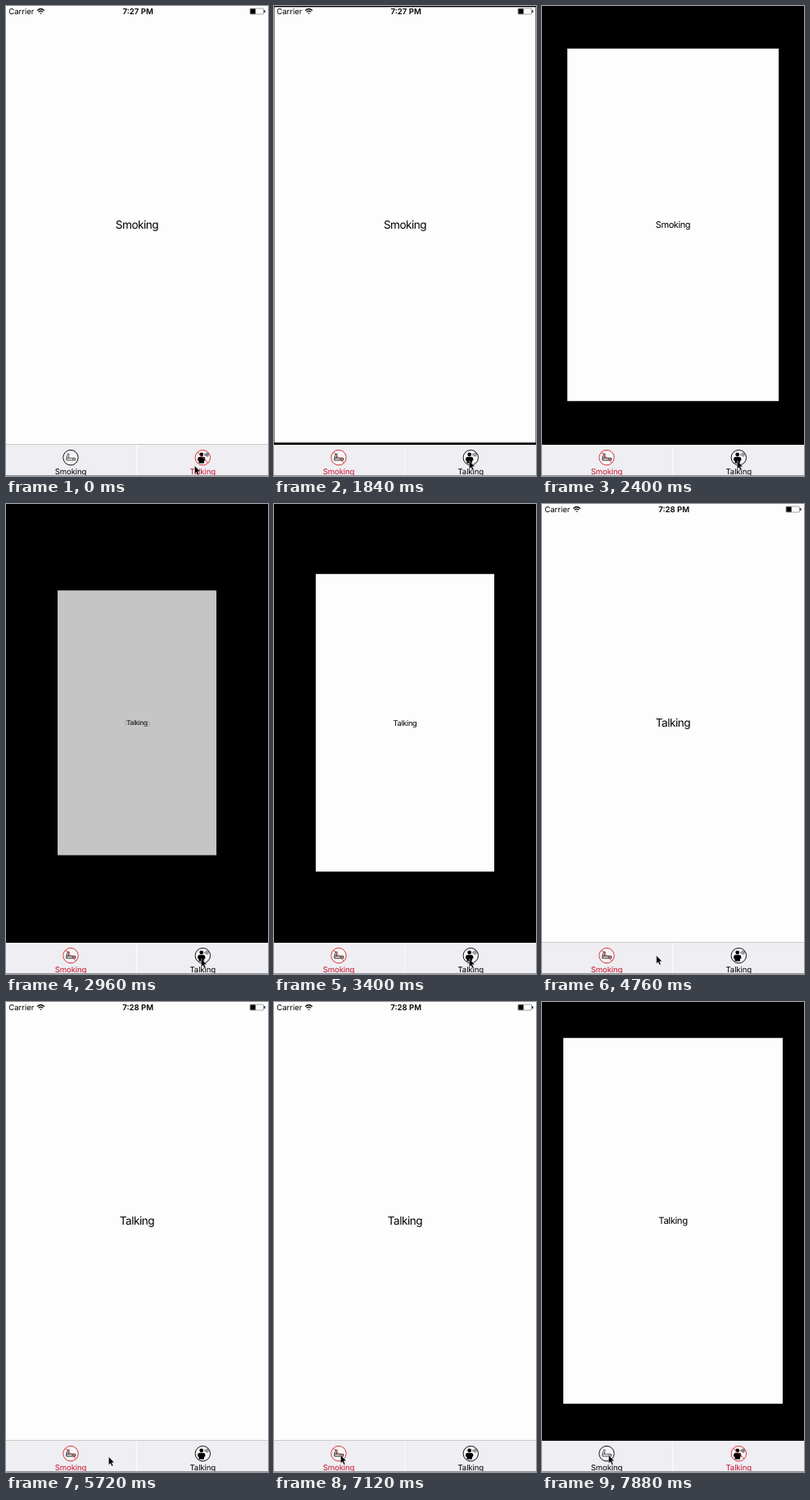
Animation of 320x572 px, one loop 8000 ms. Source, as an HTML page:

```html
<!DOCTYPE html>
<html lang="en">
<head>
<meta charset="utf-8">
<title>Tab zoom transition</title>
<style>
  html, body { margin: 0; width: 100%; height: 100%; overflow: hidden; background: #000; }
  svg { display: block; width: 100%; height: 100%; }
  text { font-family: Inter, Roboto, sans-serif; text-rendering: geometricPrecision; }
  .view text { font-size: 13.6px; letter-spacing: -.5px; text-anchor: middle; }
  .view rect { fill: #fdfdfd; }
  .tab text { font-size: 9.6px; letter-spacing: -.1px; text-anchor: middle; }
  .ring { fill: #f6f6f9; stroke: #111; }
  .line { fill: none; stroke: #222; stroke-width: .8; }
  .slash { stroke: #dc3434; visibility: hidden; }
  .off text { fill: #c8142f; }
  .off .ring { stroke: #dc3434; }
  .off .slash { visibility: visible; }
  .off .line { stroke-width: 1; }
</style>
</head>
<body>
<svg viewBox="0 0 320 572" preserveAspectRatio="none">
  <rect id="back" width="320" height="572"/>

  <g class="view" id="smokingView">
    <rect x="-160" y="-265.8" width="320" height="531.6"/>
    <text y="4.8">Smoking</text>
  </g>
  <g class="view" id="talkingView">
    <rect x="-160" y="-265.8" width="320" height="531.6"/>
    <text y="4.8">Talking</text>
  </g>

  <text x="3.3" y="10" font-size="9.5">Carrier</text>
  <g fill="none" stroke="#000" stroke-width="1.3">
    <path d="M38.2 5.4Q42.5 1.5 46.8 5.4M39.8 7.3Q42.5 5 45.2 7.3"/>
    <path d="M41.2 8.4h2.6L42.5 9.9z" fill="#000" stroke="none"/>
  </g>
  <text id="clock" x="161.2" y="10" font-size="9.6" font-weight="600" text-anchor="middle">7:27 PM</text>
  <rect x="298" y="3" width="16.5" height="7" rx="1" fill="none" stroke="#000" stroke-opacity=".5" stroke-width=".7"/>
  <rect x="298.4" y="3.4" width="6.3" height="6.2"/>
  <rect x="315.2" y="5" width="1.2" height="3"/>

  <rect y="534" width="320" height="38" fill="#eeeef3"/>
  <rect y="533" width="320" height="1" fill-opacity=".2"/>
  <rect x="159" y="534" width="1" height="38" fill="#fcfcfe"/>

  <g class="tab" id="smokingTab" transform="translate(79 549.6)">
    <circle class="ring" r="9.2"/>
    <path class="line" d="M-5.2 .6H5.6V3.2H-5.2zM-4.8 .4V-2L-3.6 -3V-5.2M-2.6 .4V-2.2L-2 -3V-5M3 .6V3.2"/>
    <path class="slash" d="M-6.5 -6.5L6.5 6.5"/>
    <text y="20.2">Smoking</text>
  </g>
  <g class="tab" id="talkingTab" transform="translate(240.3 549.6)">
    <circle class="ring" r="9.2"/>
    <circle cx="-1.6" cy="-3.8" r="2.4"/>
    <path d="M-6.2 3.6V1.4Q-6 -.8 -3.8 -.8H.6Q2.8 -.8 3 1.4V3.6L1.6 4V6.8H-4.8V4z"/>
    <path class="line" d="M2.4 -4.8q1 1.2 0 2.4M4 -5.6q1.8 2 0 4M5.6 -6.2q2.4 2.6 0 5.2"/>
    <path class="slash" d="M-6.5 -6.5L6.5 6.5"/>
    <text y="20.2">Talking</text>
  </g>
  <rect y="571" width="320" height="1" fill="#8c8c92"/>

  <path id="cursor" d="M.4 .4V10.4L2.6 8.4L4.2 12L5.8 11.3L4.3 7.6H7.3z" stroke="#fff" stroke-width=".4"/>
</svg>
<script>
const LOOP = 8000, TO_TALKING = 1840, SWAP = 2960, SETTLED = 4280, TO_SMOKING = 7480;
const $ = id => document.getElementById(id);

// Progress from 0 to 1 between two times.
const ramp = (t, from, to) => Math.min(1, Math.max(0, (t - from) / (to - from)));
const smooth = u => u * u * (3 - 2 * u);
const shrink = u => .997 - .36 * u ** 1.8;

function zoom(t) {
  if (t >= TO_SMOKING) return shrink(ramp(t, TO_SMOKING, TO_SMOKING + 630));
  if (t < TO_TALKING || t >= SETTLED) return 1;
  if (t < SWAP) return shrink(ramp(t, TO_TALKING, TO_TALKING + 800));
  return .606 + .357 * ramp(t, 3160, 3840) ** 1.5 + .037 * Math.sqrt(ramp(t, 4040, SETTLED));
}

function pointer(t) {
  let x = 230, y = 559;
  const move = (from, to, toX, toY) => {
    const e = smooth(ramp(t, from, to));
    x += (toX - x) * e;
    y += (toY - y) * e;
  };
  move(40, 760, 238, 553);
  move(4480, 5000, 62, 546);
  move(5000, 5720, 125, 553);
  move(5840, 6400, 77, 549);
  move(6600, 7000, 81, 551);
  return [x, y];
}

function draw(t) {
  const scale = zoom(t);
  const fade = t < SWAP ? 0 : .67 + .33 * ramp(t, 3160, 3240);
  const talking = t >= TO_TALKING && t < TO_SMOKING;

  for (const [id, alpha] of [["smokingView", 1 - fade], ["talkingView", fade]]) {
    $(id).setAttribute("transform", `translate(160 266.3) scale(${scale})`);
    $(id).setAttribute("opacity", alpha);
  }
  $("back").setAttribute("fill", scale < 1 ? "#000" : "#fdfdfd");
  $("clock").textContent = t < SWAP ? "7:27 PM" : "7:28 PM";
  $("smokingTab").classList.toggle("off", talking);
  $("talkingTab").classList.toggle("off", !talking);
  $("cursor").setAttribute("transform", `translate(${pointer(t)})`);
}

const start = performance.now();
function tick() {
  draw((performance.now() - start) % LOOP);
  requestAnimationFrame(tick);
}
tick();
</script>
</body>
</html>
```
